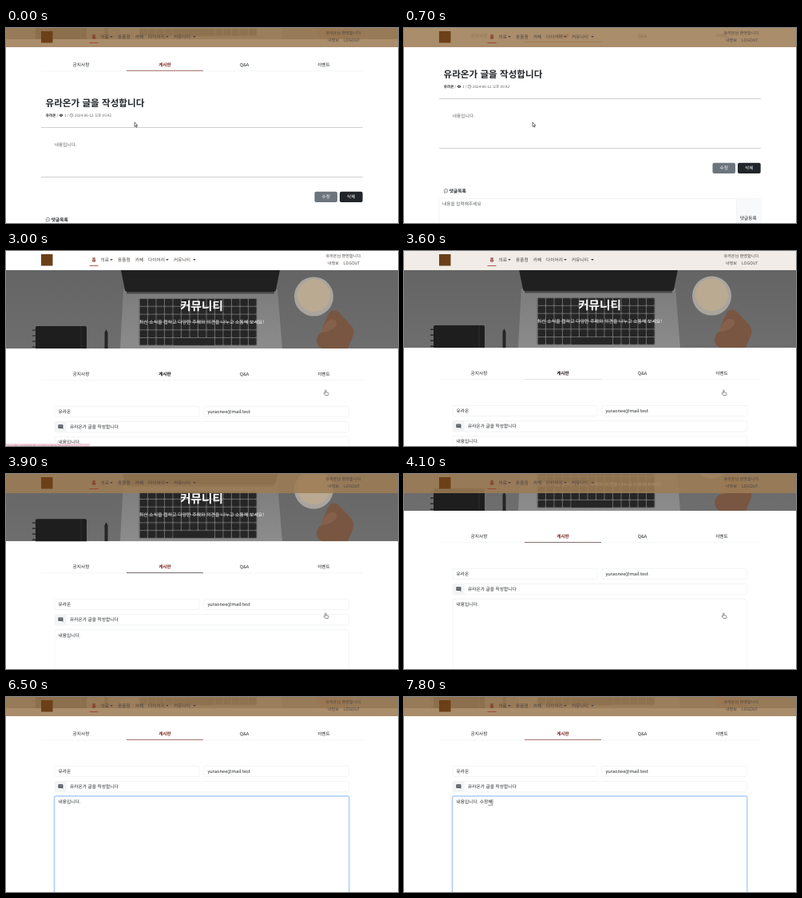
Write an HTML page that moves like this. It is 491 px wide and 244 px high and loops after 8000 ms.

```html
<!DOCTYPE html>
<html lang="ko">
<head>
<meta charset="utf-8">
<title>게시판</title>
<style>
  html, body { margin: 0; width: 100%; height: 100%; overflow: hidden; background: #fff; }
  svg { display: block; width: 100vw; height: 100vh; }
  text { font: 5.7px "Noto Sans CJK KR", "Noto Sans CJK", "Noto Sans CJK JP", sans-serif; fill: #212529;
         text-rendering: geometricPrecision; white-space: pre; }
  .mid { text-anchor: middle; }
  .bold { font-weight: 700; }
  .white { fill: #fff; }
  .grey { fill: #5c5f63; }
  .small { font-size: 5.1px; }
  .meta { font-size: 4.6px; }
  .title { font-size: 11.6px; font-weight: 600; }
  .banner { font-size: 14.6px; font-weight: 700; }
  .lead { font-size: 5.92px; font-weight: 500; }
  .nav text { fill: #4c4540; }
  .nav .on { fill: #7d2f22; font-weight: 600; }
  .field { fill: #fff; stroke: #e6e8eb; stroke-width: .5; }

  #page, #article, #form, #bar, #tab, #line, #edit, #status, #cursor, #arrow, #hand, #area, #ring {
    animation: 8s linear infinite;
  }
  #page { animation-name: scroll; }
  @keyframes scroll {
    0%, 3.75% { transform: translateY(-108px); animation-timing-function: ease-in-out; }
    8.75%, 37.49% { transform: translateY(-144px); animation-timing-function: step-end; }
    37.5%, 44.375% { transform: translateY(0); animation-timing-function: cubic-bezier(.364, 0, .636, 1); }
    55.25%, 100% { transform: translateY(-108px); }
  }
  #article { animation-name: before; animation-timing-function: step-end; }
  @keyframes before { 0% { visibility: visible; } 37.5%, 100% { visibility: hidden; } }
  #form { animation-name: after; animation-timing-function: step-end; }
  @keyframes after { 0% { visibility: hidden; } 37.5%, 100% { visibility: visible; } }

  #bar { animation-name: bar; }
  @keyframes bar {
    0%, 37.49% { fill: rgba(158, 125, 86, .87); }
    37.5%, 44.4% { fill: rgba(255, 255, 255, 1); }
    48.2%, 100% { fill: rgba(158, 125, 86, .87); }
  }
  #tab { animation-name: tab; }
  @keyframes tab {
    0%, 37.49% { fill: #7d2520; }
    37.5%, 44.4% { fill: #111; }
    48.7%, 100% { fill: #7d2520; }
  }
  #line { animation-name: line; }
  @keyframes line {
    0%, 37.49% { opacity: 1; fill: #8f4f45; }
    37.5%, 44.4% { opacity: 0; fill: #26282c; }
    48.7% { opacity: 1; fill: #43393e; }
    55%, 100% { opacity: 1; fill: #8f4f45; }
  }
  #edit { animation-name: hover; }
  @keyframes hover { 0%, 26.5% { fill: #6c757d; } 28.4%, 100% { fill: #5c636a; } }
  #status { animation-name: status; animation-timing-function: step-end; }
  @keyframes status { 0% { opacity: 0; } 28.75% { opacity: 1; } 41.25%, 100% { opacity: 0; } }

  #cursor { animation-name: move; }
  @keyframes move {
    0%, 11.25% { transform: translate(161px, 118px); animation-timing-function: ease-in-out; }
    23.75% { transform: translate(347px, 162.6px); animation-timing-function: ease-out; }
    27.5%, 100% { transform: translate(399.6px, 174px); }
  }
  #arrow { animation-name: arrow; animation-timing-function: step-end; }
  @keyframes arrow { 0% { opacity: 1; } 26.25%, 100% { opacity: 0; } }
  #hand { animation-name: hand; animation-timing-function: step-end; }
  @keyframes hand { 0% { opacity: 0; } 26.25% { opacity: 1; } 53.75%, 100% { opacity: 0; } }

  #area { animation-name: area; }
  @keyframes area { 0%, 73.7% { stroke: #e6e8eb; } 75.6%, 100% { stroke: #86b7fe; } }
  #ring { animation-name: ring; }
  @keyframes ring { 0%, 73.7% { opacity: 0; } 75.6%, 100% { opacity: 1; } }
</style>
</head>
<body>
<svg viewBox="0 0 491 244" preserveAspectRatio="none">
  <defs>
    <linearGradient id="desk" x2="0" y2="1">
      <stop offset="0" stop-color="#646464"/>
      <stop offset="1" stop-color="#6e6e6e"/>
    </linearGradient>
    <linearGradient id="metal" x2="0" y2="1">
      <stop offset="0" stop-color="#7c7c7c"/>
      <stop offset="1" stop-color="#8c8c8c"/>
    </linearGradient>
    <pattern id="keys" x="167.500" y="60" width="10.500" height="9.800" patternUnits="userSpaceOnUse">
      <rect width="9.500" height="8.700" rx="1" fill="#262626"/>
    </pattern>
    <clipPath id="frame"><rect y="24" width="491" height="98"/></clipPath>
    <path id="caret" d="M-1.9-1h3.8L0 1z" fill="#4c4540"/>
  </defs>

  <g id="page">
    <g clip-path="url(#frame)">
      <rect y="24" width="491" height="98" fill="url(#desk)"/>
      <rect x="37" y="94" width="64" height="30" rx="2" fill="#1e1e1e"/>
      <path d="M33 99h7M33 106h7M33 113h7M33 120h7" stroke="#1e1e1e" stroke-width="1.200"/>
      <path d="M94 94v28" stroke="#333" stroke-width=".8"/>
      <path d="M123.500 122v-20l2-4 2 4v20z" fill="#262626"/>
      <path d="M147 48h193l6 74H143z" fill="url(#metal)"/>
      <path d="M144 24h199l-5 25q-.5 2-3 2H152q-2.500 0-3-2z" fill="#202020"/>
      <path d="M151 51h185v2.500H151z" fill="#4a4a4a"/>
      <rect x="166.500" y="59" width="148" height="59.500" rx="1.500" fill="#696969"/>
      <rect x="167.500" y="60" width="146.500" height="57.700" fill="url(#keys)"/>
      <rect x="209.500" y="109" width="51.500" height="8.700" rx="1" fill="#262626"/>
      <circle cx="385.500" cy="57" r="24.500" fill="#a9a59e"/>
      <circle cx="385.500" cy="55.500" r="20.500" fill="#b9aa91"/>
      <path d="M405 77q6-6 12 0l16 17q4 6 1 14l-6 14h-32q-7-3-7-10 1-9 8-11-2-5 8-24z" fill="#795642"/>
      <path d="M400 91q8-9 14-3 2 6-6 10-7 4-11 4-3-4 3-11z" fill="#85604b"/>
    </g>
    <text class="banner white mid" x="245" y="73.500">커뮤니티</text>
    <text class="lead white mid" x="245" y="91.200">최신 소식을 접하고 다양한 주제와 의견을 나누고 소통해 보세요!</text>

    <path d="M44 161.800h403" stroke="#e8eaec" stroke-width=".5"/>
    <rect id="line" x="151" y="161.200" width="96" height=".75"/>
    <g class="mid">
      <text x="94" y="156.200">공지사항</text>
      <text id="tab" class="bold" x="199" y="156.200">게시판</text>
      <text x="298.500" y="156.200">Q&amp;A</text>
      <text x="398" y="156.200">이벤트</text>
    </g>

    <g id="article">
      <text class="title" x="49.500" y="205.600">유라온가 글을 작성합니다</text>
      <text class="meta bold" x="49.800" y="219">유라온</text>
      <text class="meta grey" x="63.600" y="219">/</text>
      <path d="M66.500 217.300q2.500-3.400 5 0-2.500 3.400-5 0z" fill="#333"/>
      <circle cx="69" cy="217.300" r=".7" fill="#fff"/>
      <text class="meta grey" x="73" y="219">1 /</text>
      <circle cx="82" cy="217.300" r="2" fill="none" stroke="#555" stroke-width=".5"/>
      <path d="M82 216v1.400l.8.600" fill="none" stroke="#555" stroke-width=".4"/>
      <text class="meta grey" x="86" y="219">2024-06-12 오후 09:42</text>
      <path d="M44 232.500h403M44 294.500h403" stroke="#b9bbbd" stroke-width=".7"/>
      <text class="grey" x="60.800" y="256.100">내용입니다.</text>
      <rect id="edit" x="386.500" y="312.700" width="28.500" height="13.300" rx="2"/>
      <rect x="418" y="312.700" width="28.700" height="13.300" rx="2" fill="#212529"/>
      <text class="white mid" x="400.700" y="321.400">수정</text>
      <text class="white mid" x="432.300" y="321.400">삭제</text>
      <path d="M50.700 349.600q-1.700-4 1.600-4.300 2.700 0 2.700 2.300t-2.700 2.200q-.8.500-1.800.500z"
            fill="none" stroke="#333" stroke-width=".5"/>
      <path d="M51.200 347.700h2.800" stroke="#333" stroke-width=".6" stroke-dasharray=".6 .5"/>
      <text class="bold" x="56.800" y="350.100">댓글목록</text>
      <rect class="field" x="44" y="357.500" width="403" height="40" rx="1.500"/>
      <rect x="416.300" y="357.700" width="30.500" height="40" fill="#f8f9fa"/>
      <path d="M416.300 357.500v40" stroke="#e6e8eb" stroke-width=".5"/>
      <text class="grey" x="48" y="366.200">내용을 입력해주세요</text>
      <text class="mid" x="431.300" y="383.800">댓글등록</text>
    </g>

    <g id="form">
      <rect class="field" x="61" y="194.300" width="181" height="13.300" rx="1.800"/>
      <rect class="field" x="248" y="194.300" width="181.300" height="13.300" rx="1.800"/>
      <text x="65.500" y="203.100">유라온</text>
      <text x="252.400" y="203.100">yuraonee@mail.test</text>
      <rect class="field" x="61" y="213.500" width="368.300" height="13.300" rx="1.800"/>
      <rect x="61.200" y="213.700" width="14.600" height="12.900" rx="1.500" fill="#f3f4f6"/>
      <path d="M66 217.300h4.800q.6 0 .6.600v5.200l-1.200-1.200H66q-.6 0-.6-.6v-3.400q0-.6.600-.6z" fill="#495057"/>
      <path d="M66.600 218.600h3.600M66.600 219.600h3.600M66.600 220.600h3.600" stroke="#c4c7ca" stroke-width=".35"/>
      <text x="80" y="222.200">유라온가 글을 작성합니다</text>
      <rect id="ring" x="60.300" y="231.800" width="369.700" height="160" rx="2.400"
            fill="none" stroke="#0d6efd" stroke-opacity=".25" stroke-width="1.500"/>
      <rect id="area" class="field" x="61" y="232.500" width="368.300" height="160" rx="1.800"/>
      <text id="typed" x="65.500" y="241.400">내용입니다.</text>
      <path id="mark" fill="none" stroke="#222" stroke-width=".5"/>
    </g>
  </g>

  <rect id="bar" width="491" height="24"/>
  <rect x="44" y="4" width="14.500" height="14.500" fill="#6b4019"/>
  <g class="nav">
    <text class="on mid" x="110" y="13.200">홈</text>
    <rect x="104.500" y="18" width="11" height=".8" fill="#9c3a2c"/>
    <text x="118.500" y="13.200">의료</text>
    <use href="#caret" x="132" y="11"/>
    <text x="140" y="13.200">용품점</text>
    <text x="161.800" y="13.200">카페</text>
    <text x="178" y="13.200">다이어리</text>
    <use href="#caret" x="202" y="11"/>
    <text x="210" y="13.200">커뮤니티</text>
    <use href="#caret" x="236" y="11"/>
    <text class="small" x="400.500" y="7.800">유라온님 환영합니다.</text>
    <text class="small" x="403" y="17">내정보</text>
    <text class="small" x="423" y="17">LOGOUT</text>
  </g>

  <g id="status">
    <rect y="241" width="105" height="3" fill="#f5d0dc"/>
    <text class="meta" x="2" y="246" fill-opacity=".5">localhost:8080/board/update?no=12</text>
  </g>

  <g id="cursor">
    <path id="arrow" d="M0 0v5.400l1.300-1.200.9 2 .9-.4-.9-1.900h1.700z" fill="#fff" stroke="#111" stroke-width=".6"/>
    <path id="hand" d="M0 .5q.7-1 1.300 0v2.300l2.300.5q.9.300.8 1.200l-.6 2.200H.6L-1.600 4q.2-.9 1.600 0z"
          fill="#fff" stroke="#111" stroke-width=".5"/>
  </g>
</svg>
<script>
  const base = "내용입니다.";
  const strokes = [
    [6800, " ㅅ"], [7000, " 수"], [7200, " 숮"], [7300, " 수저"],
    [7400, " 수정"], [7700, " 수정ㅎ"], [7800, " 수정해"]
  ];
  const typed = document.getElementById("typed");
  const mark = document.getElementById("mark");
  let shown = "";

  function draw() {
    const t = performance.now() % 8000;
    const added = strokes.reduce((s, [at, text]) => t >= at ? text : s, "");
    if (added !== shown) {
      shown = added;
      typed.textContent = base + added;
      const end = 65.5 + typed.getComputedTextLength();
      // Underline and caret around the syllable being composed
      mark.setAttribute("d", added ? `M${end - 5.2} 243.300H${end + .4}V236.200` : "");
    }
    requestAnimationFrame(draw);
  }
  draw();
</script>
</body>
</html>
```
